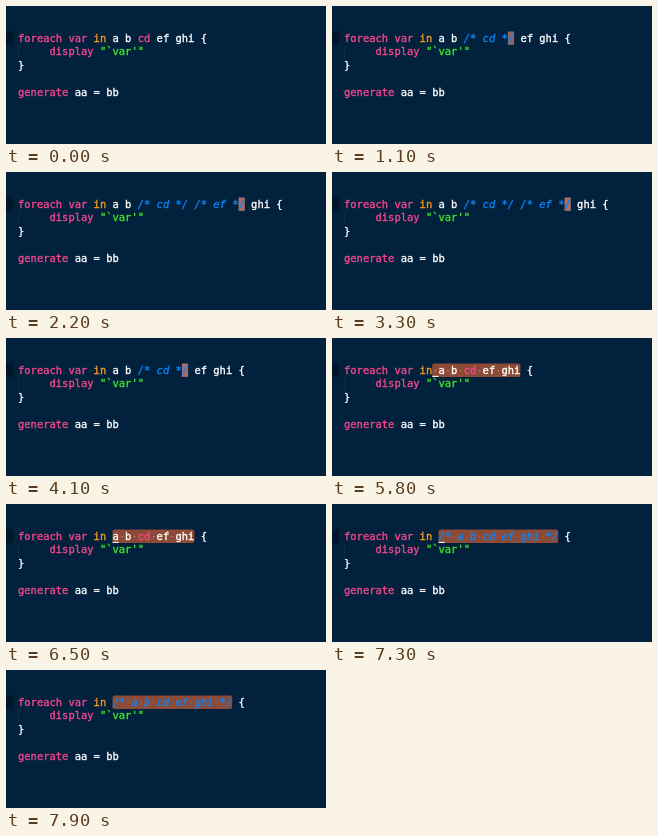
An HTML page with a canvas that plays this animation: 320 px wide and 138 px high, repeating every 8000 ms.

```html
<!DOCTYPE html>
<html lang="en">
<head>
<meta charset="utf-8">
<title>Commenting code</title>
<style>
html, body { margin: 0; width: 100%; height: 100%; overflow: hidden; background: #02213d; }
canvas { display: block; width: 320px; height: 138px; }
</style>
</head>
<body>
<canvas id="stage"></canvas>
<script>
const W = 320, H = 138, LOOP = 8000;
const LEFT = 12, CELL = 6.3, BASE = 36, LINE = 13.4;
const FONT = '10.46px "DejaVu Sans Mono", "Liberation Mono", monospace';
const PINK = '#f5478d', WHITE = '#ffffff', ORANGE = '#f79a1c', GREEN = '#3fe62b', BLUE = '#0d83f2';

const canvas = document.getElementById('stage');
const ctx = canvas.getContext('2d');
const ratio = window.devicePixelRatio || 1;
canvas.width = W * ratio;
canvas.height = H * ratio;

// Each state lasts until the next one; sel is the last selected column.
const states = [
  { at: 0 },
  { at: 100, cur: 19 },
  { at: 300, cur: 20 },
  { at: 500, cd: true, cur: 26 },
  { at: 1200, cd: true, cur: 28 },
  { at: 1600, cd: true, cur: 29 },
  { at: 2000, cd: true, ef: true, cur: 35 },
  { at: 3700, cd: true, cur: 29 },
  { at: 4100, cd: true, cur: 26 },
  { at: 4400, cur: 20 },
  { at: 4900, cur: 23 },
  { at: 5100, cur: 27 },
  { at: 5300, cur: 27, sel: 27, to: 14, span: 450 },
  { at: 6050, cur: 15, sel: 27 },
  { at: 7100, all: true, cur: 15, sel: 33 }
];

const colX = col => LEFT + col * CELL;

function write(row, col, text, color, italic) {
  ctx.font = (italic ? 'italic ' : '') + FONT;
  ctx.fillStyle = ctx.strokeStyle = color;
  ctx.lineWidth = 0.35;
  const y = BASE + row * LINE;
  for (let i = 0; i < text.length; i++) {
    ctx.fillText(text[i], colX(col + i), y);
    ctx.strokeText(text[i], colX(col + i), y);
  }
  return col + text.length;
}

function writeParts(row, col, parts) {
  for (const [text, color, italic] of parts) col = write(row, col, text, color, italic);
}

function comment(text) {
  return ['/* ' + text + ' */', BLUE, true];
}

function listParts(s) {
  if (s.all) return [comment('a b cd ef ghi')];
  return [
    ['a b ', WHITE],
    s.cd ? comment('cd') : ['cd', PINK],
    [' ', WHITE],
    s.ef ? comment('ef') : ['ef', WHITE],
    [' ghi', WHITE]
  ];
}

function drawSelection(from, to) {
  ctx.fillStyle = '#8b4b37';
  ctx.beginPath();
  ctx.roundRect(colX(from), 25.5, (to - from + 1) * CELL, 13.6, 2);
  ctx.fill();
}

function drawSpaces(line, from, to, alpha) {
  ctx.fillStyle = `rgba(225, 165, 145, ${alpha})`;
  for (let c = from; c <= to; c++) {
    if (line[c] === ' ') ctx.fillRect(colX(c) + 2.6, 32, 1.2, 1.2);
  }
}

function drawBlock(col, alpha) {
  ctx.globalAlpha = alpha;
  ctx.fillStyle = '#a46f66';
  ctx.fillRect(colX(col), 25.5, CELL, 13.4);
  ctx.globalAlpha = 1;
}

// Smooth caret fade; settles to full shortly after every move.
function caretAlpha(t, since) {
  const age = t - since;
  if (age < 500) return 1;
  return 0.6 + 0.4 * Math.cos((age - 500) / 800 * Math.PI * 2);
}

function draw(t) {
  const s = states.filter(v => v.at <= t).pop();
  const age = t - s.at;
  let cur = s.cur;
  if (s.to) cur = Math.round(s.cur + (s.to - s.cur) * Math.min(1, age / s.span));

  ctx.setTransform(ratio, 0, 0, ratio, 0, 0);
  ctx.fillStyle = '#02213d';
  ctx.fillRect(0, 0, W, H);
  ctx.fillStyle = '#011629';
  ctx.fillRect(0, 25.5, 7, 13.4);
  ctx.fillStyle = '#173650';
  for (let y = 40; y < 52; y += 2) ctx.fillRect(12, y, 1, 1);

  const parts = [['foreach var ', PINK], ['in ', ORANGE], ...listParts(s), [' {', WHITE]];
  const line = parts.map(p => p[0]).join('');

  if (s.sel) {
    drawSelection(cur, s.sel);
    drawSpaces(line, cur, s.sel, s.all ? 0.3 : 0.75);
  } else if (cur !== undefined) {
    drawBlock(cur, caretAlpha(t, s.at));
  }

  writeParts(0, 0, parts);
  writeParts(1, 5, [['display ', PINK], ['"`var\'"', GREEN]]);
  write(2, 0, '}', WHITE);
  writeParts(4, 0, [['generate ', PINK], ['aa = bb', WHITE]]);

  if (s.sel && t < 7500) {
    ctx.fillStyle = '#f3e9e4';
    ctx.fillRect(colX(cur), 37.8, CELL, 1.2);
  }
}

const start = performance.now();
function tick() {
  draw((performance.now() - start) % LOOP);
  requestAnimationFrame(tick);
}
tick();
</script>
</body>
</html>
```
